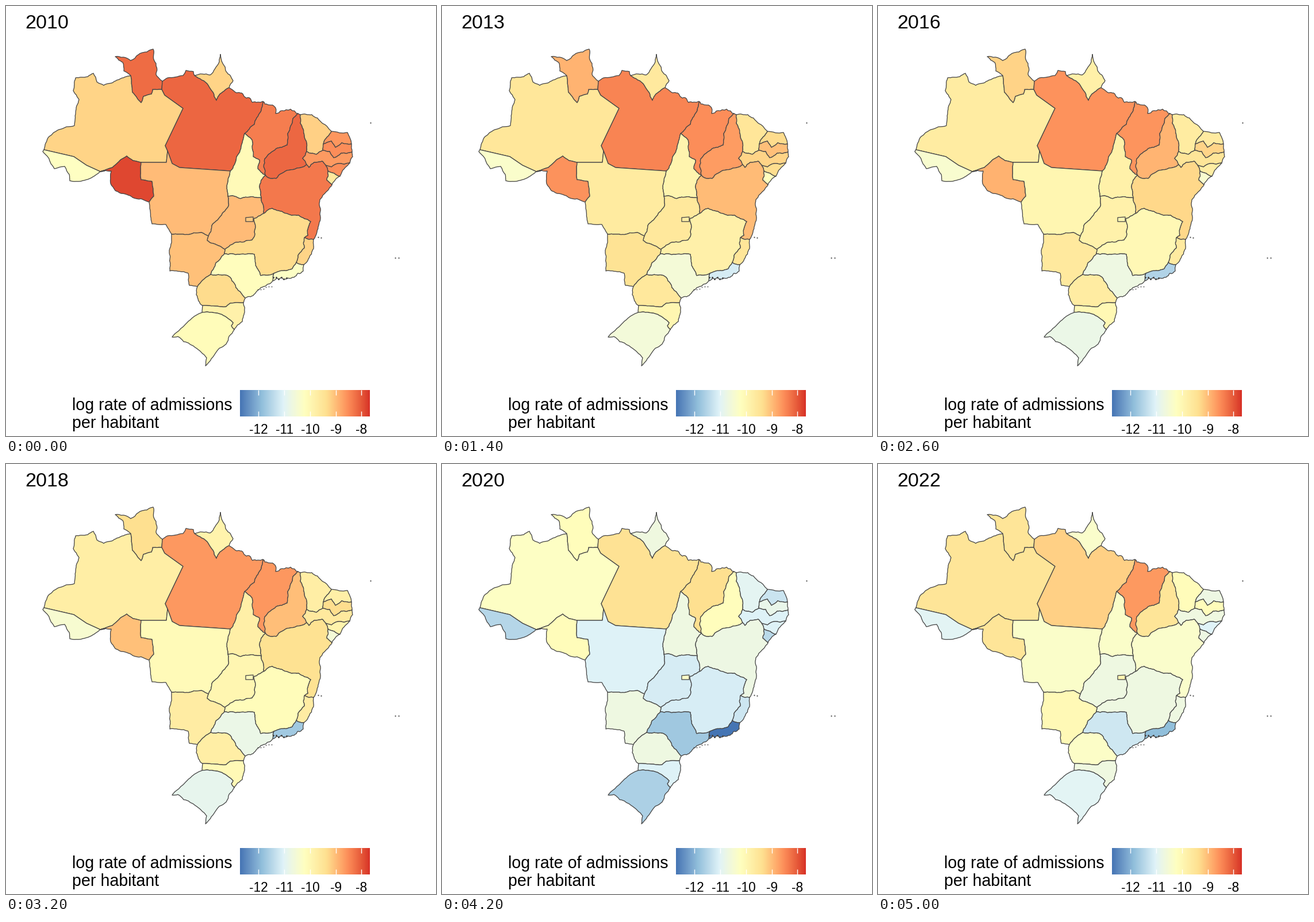
Recreate the animation shown at these times as a matplotlib script. Size 748x748 px, loop 5200 ms.

```python
import matplotlib.pyplot as plt
import numpy as np
from matplotlib.animation import FuncAnimation
from matplotlib.collections import LineCollection, PolyCollection

SIZE, DPI = 748, 88
PX = 72 / DPI
FRAMES, STEP = 26, 200
FONT = "Liberation Sans"
LINE = "#474747"
PALETTE = ["#4575b4", "#91bfdb", "#e0f3f8", "#ffffbf",
           "#fee090", "#fc8d59", "#d73027"]

# --- colour scale, blended in CIE Lab ---
XYZ = np.array([[.4124, .3576, .1805], [.2126, .7152, .0722], [.0193, .1192, .9505]])
WHITE = XYZ.sum(axis=1)
MIX = np.array([[0, 116, 0], [500, -500, 0], [0, 200, -200]])


def to_lab(rgb):
    lin = np.where(rgb > .04045, ((rgb + .055) / 1.055) ** 2.4, rgb / 12.92)
    return np.cbrt(lin @ XYZ.T / WHITE) @ MIX.T - [16, 0, 0]


def to_rgb(lab):
    f = (lab + [16, 0, 0]) @ np.linalg.inv(MIX).T
    lin = np.clip((f ** 3 * WHITE) @ np.linalg.inv(XYZ).T, 0, 1)
    return np.where(lin > .0031308, 1.055 * lin ** (1 / 2.4) - .055, 12.92 * lin)


def hex_rgb(h):
    return [int(h[i:i + 2], 16) / 255 for i in (1, 3, 5)]


LAB = to_lab(np.array([hex_rgb(h) for h in PALETTE]))


def shade(levels):
    """Colours for positions 0..6 along the palette."""
    lab = np.stack([np.interp(levels, range(7), c) for c in LAB.T], axis=-1)
    return np.clip(to_rgb(lab), 0, 1)


# --- map: corners joined by fractal borders ---
CORNERS = dict(
    A=(66, 250), B=(217, 121), C=(271, 145), D=(272, 131), E=(328, 121), F=(388, 142),
    G=(447, 166), H=(415, 222), I=(390, 287), J=(281, 252), K=(235, 272), L=(164, 288),
    M=(249, 341), N=(288, 397), O=(352, 400), P=(386, 331), Q=(381, 423), R=(380, 431),
    S=(356, 467), T=(333, 488), U=(444, 334), V=(448, 361), W=(451, 294), X=(508, 187),
    Y=(512, 189), Z=(523, 253), a=(523, 276), b=(566, 218), c=(552, 240), d=(551, 251),
    e=(601, 240), f=(602, 254), g=(598, 273), h=(556, 277), i=(560, 287), j=(581, 296),
    k=(567, 311), l=(535, 406), m=(519, 403), n=(505, 446), o=(518, 450), p=(466, 465),
    q=(464, 478), r=(416, 508), s=(413, 516), t=(342, 521), u=(341, 533), v=(397, 563))
CORNERS.update({"1": (111, 304), "2": (373, 84), "3": (347, 626)})

rng = np.random.default_rng(11)
borders, shapes, levels = {}, [], []


def wander(a, b, wiggle):
    """Midpoint displacement from a up to, but without, b."""
    d = b - a
    if not wiggle or np.hypot(*d) < 4:
        return [a]
    mid = (a + b) / 2 + rng.uniform(-wiggle, wiggle) * np.array([-d[1], d[0]])
    return wander(a, mid, wiggle) + wander(mid, b, wiggle)


def border(ends, *xy, wiggle=.1):
    first, last = (np.array(CORNERS[c], float) for c in ends)
    pts = [first, *np.array(xy, float).reshape(-1, 2), last]
    line = [p for a, b in zip(pts, pts[1:]) for p in wander(a, b, wiggle)]
    borders[ends] = np.array(line + [last])


def side(ends):
    if ends[::-1] in borders:
        return borders[ends[::-1]][::-1]
    if ends not in borders:
        border(ends)
    return borders[ends]


def region(ring, start, calm, low, last):
    """Corner names around the region, then its palette levels."""
    shapes.append(np.vstack([side(x + y) for x, y in zip(ring, ring[1:] + ring[0])
                             if x != y]))
    levels.append((start, calm, low, last))


# coast and outer frontier
border("AB", 75, 227, 92, 215, 119, 208, 127, 163, 117, 147, 121, 125, 142, 123,
       152, 117, 158, 132, 170, 138, 200, 126, wiggle=.07)
border("BD", 205, 113, 203, 98, 190, 88, 217, 95, 245, 80, 256, 75, 261, 100, 261, 119)
border("DE", 281, 125, 308, 121, 313, 112, 326, 114)
border("E2", 355, 120, 371, 97)
border("2F", 383, 114, 395, 130)
border("FG", 399, 150, 414, 157, wiggle=.2)
border("GX", 466, 174, 469, 187, 480, 182, wiggle=.2)
border("Yb", 532, 189)
border("be", 594, 220, wiggle=.06)
border("fg", 603, 262)
border("kl", 546, 337, 546, 362)
border("lo", 535, 422, 526, 440)
border("oq", 517, 461, 501, 472, 480, 473, wiggle=.2)
border("qr", 448, 488, wiggle=.15)
border("sv", 415, 533, 411, 549)
border("v3", 383, 588, 363, 606)
border("3u", 349, 612, 317, 586, 309, 584, 299, 575, 289, 576, 304, 561, 326, 541,
       wiggle=.06)
border("tT", 331, 502)
border("TN", 319, 486, 317, 465, 285, 461, 284, 425, wiggle=.08)
border("NM", 278, 380, 254, 379, 250, 352, wiggle=.04)
border("ML", 220, 333, 190, 321, 182, 309, 183, 287, wiggle=.08)
border("L1", 146, 300, 129, 305, wiggle=.05)
border("1A", 110, 293, 102, 279, 84, 283, 75, 266, 64, 253, wiggle=.06)

# frontiers between regions
border("AL", 118, 262, 140, 277, wiggle=0)
border("BC", 220, 150, 235, 168, 239, 157, 253, 153, 255, 145, wiggle=.06)
border("CD", wiggle=0)
border("CJ", 276, 155, 308, 178, 277, 243, wiggle=0)
border("JK", 279, 272, wiggle=0)
border("KL", 221, 269, 210, 261, 200, 267, 185, 281, wiggle=.04)
border("KM", 235, 302, 254, 305, 257, 331, wiggle=.05)
border("JI", 289, 274, 302, 281, wiggle=0)
border("EF", 352, 138, 366, 164, 376, 150)
border("GH", 443, 184, 432, 206)
border("HI", 411, 238)
border("IP", 384, 313)
border("HW", 428, 233, 430, 262, 441, 268, 438, 283)
border("XW", 499, 196, 490, 222, 489, 242, 470, 248, 450, 266)
border("WU", 441, 312)
border("PU", 408, 335)
border("PO", 387, 348, 358, 382)
border("NO", 340, 394, wiggle=.08)
border("OQ", 350, 408)
border("QV", 400, 411, 428, 407, 434, 385, 431, 370)
border("ST", 342, 477)
border("Rp", 432, 432, 443, 469)
border("Sr", 390, 472, 404, 495)
border("np", 498, 457)
border("mn", 519, 421, 508, 434)
border("Vm", 463, 352, 509, 364, 530, 375, 525, 388, 525, 399)
border("Wa", 457, 299, 470, 300, 480, 291, 506, 282)
border("Za", 516, 265)
border("YZ", 512, 204, 519, 225)
border("Zd", 540, 258)
border("cb", 556, 231)
border("ce", 566, 235, 573, 246, 584, 238)
border("df", 563, 253, 570, 264, 583, 256)
border("ah", 527, 281, 536, 272, 550, 270)
border("hg", 566, 280, 578, 274)
border("ik", 558, 303)
border("ts", 383, 523, 390, 517, wiggle=.04)
border("uv", 376, 537, 395, 551, 392, 556, wiggle=.06)

region("ABCJKL", 4.15, 3.55, 2.92, 3.83)
region("BDC", 5.4, 4, 3.08, 3.83)
region("DEFGHIJC", 5.47, 4.87, 3.92, 4.2)
region("E2F", 4.15, 3.4, 2.45, 2.8)
region("AL1", 2.95, 2.7, 1.45, 2.07)
region("KML", 5.8, 4.4, 3.1, 3.83)
region("GXWH", 5.2, 4.88, 4, 4.86)
region("XYZaW", 5.45, 4.42, 3.07, 3.83)
region("YbcdZ", 4.2, 3.55, 2.1, 3.1)
region("bec", 4.9, 3.5, 1.72, 2.37)
region("efdc", 5, 4.03, 2.25, 3.1)
region("fghaZd", 4.85, 3.7, 1.98, 2.43)
region("gjih", 5, 3.4, 1.98, 2)
region("jki", 3.7, 2.6, 1.5, 2.38)
region("klmVUWahi", 5.25, 3.95, 2.38, 2.8)
region("HWUPI", 3.15, 3.5, 2.4, 2.82)
region("JIPONMK", 4.45, 3.15, 1.98, 2.82)
region("PUVQO", 4.45, 3.3, 1.87, 2.4)
region("NOQRST", 4.4, 3.6, 2.4, 3.2)
region("QVmnpR", 4.05, 3.1, 1.88, 2.4)
region("lonm", 4.15, 3.6, 1.75, 2.4)
region("oqpn", 2.9, 1.2, 0, 1)
region("RpqrS", 3.05, 2.3, 1.18, 1.77)
region("SrstT", 4.05, 3.55, 2.4, 2.87)
region("tsvu", 3.45, 3.2, 1.98, 2.42)
region("uv3", 3.1, 2.2, 1.33, 2.07)

# the small enclosed district
shapes.append(np.array([(417, 368), (430, 367), (430, 375), (417, 375)]))
levels.append((4.3, 3.1, 2.85, 3.3))

START, CALM, LOW, LAST = np.array(levels).T

# --- stage ---
fig = plt.figure(figsize=(SIZE / DPI, SIZE / DPI), dpi=DPI, facecolor="white")
ax = fig.add_axes([0, 0, 1, 1])
ax.axis("off")


def text(x, y, s, size, ha="left"):
    return ax.text(x, y, s, fontsize=size * PX, family=FONT, color="black",
                   ha=ha, va="baseline")


def islets(radius, x, y):
    ax.scatter(x, y, s=(2 * radius * PX) ** 2, c=LINE, linewidths=0)


states = PolyCollection(shapes, edgecolors=LINE, linewidths=1.3 * PX, joinstyle="round")
ax.add_collection(states)
islets(1.1, [634.5, 677, 683, 548, 543], [202.5, 438, 438, 402.5, 402])
near = np.linspace(438, 462, 6)
islets(.9, near, 494 - (near - 438) / 4 + rng.uniform(-1, 1, 6))
islets(1.5, np.linspace(465, 488, 6), 473 + rng.uniform(-2, 2, 6))

# colour bar
ax.imshow(shade(np.linspace(0, 6, 300))[None], extent=(407, 633, 714, 668),
          aspect="auto", interpolation="bilinear")
ticks = [439.5 + 44.7 * k for k in range(5)]
ax.add_collection(LineCollection(
    [[(x, y), (x, y + 9)] for x in ticks for y in (668, 705)],
    colors="white", linewidths=1.4 * PX, capstyle="butt"))
for k, x in enumerate(ticks):
    text(x, 744, str(k - 12), 22.6, "center")
text(115, 703, "log rate of admissions", 28.6)
text(115, 734, "per habitant", 28.6)
title = text(33, 39, "2010", 34)
ax.set_xlim(0, SIZE)
ax.set_ylim(SIZE, 0)


def level(i):
    """Eased decline, a short rest, a sharp drop, then recovery."""
    if i <= 16:
        return START + (CALM - START) * (i / 16) ** .6
    if i <= 21:
        return CALM + (LOW - CALM) * max(0, (i - 19) / 2)
    return LOW + (LAST - LOW) * (i - 21) / 4


def draw(i):
    states.set_facecolor(shade(level(i)))
    title.set_text(str(int(2010 + 12 * i / (FRAMES - 1) + .5)))
    return states, title


anim = FuncAnimation(fig, draw, frames=FRAMES, interval=STEP, repeat=True,
                     repeat_delay=0, blit=False)
plt.show()
```
